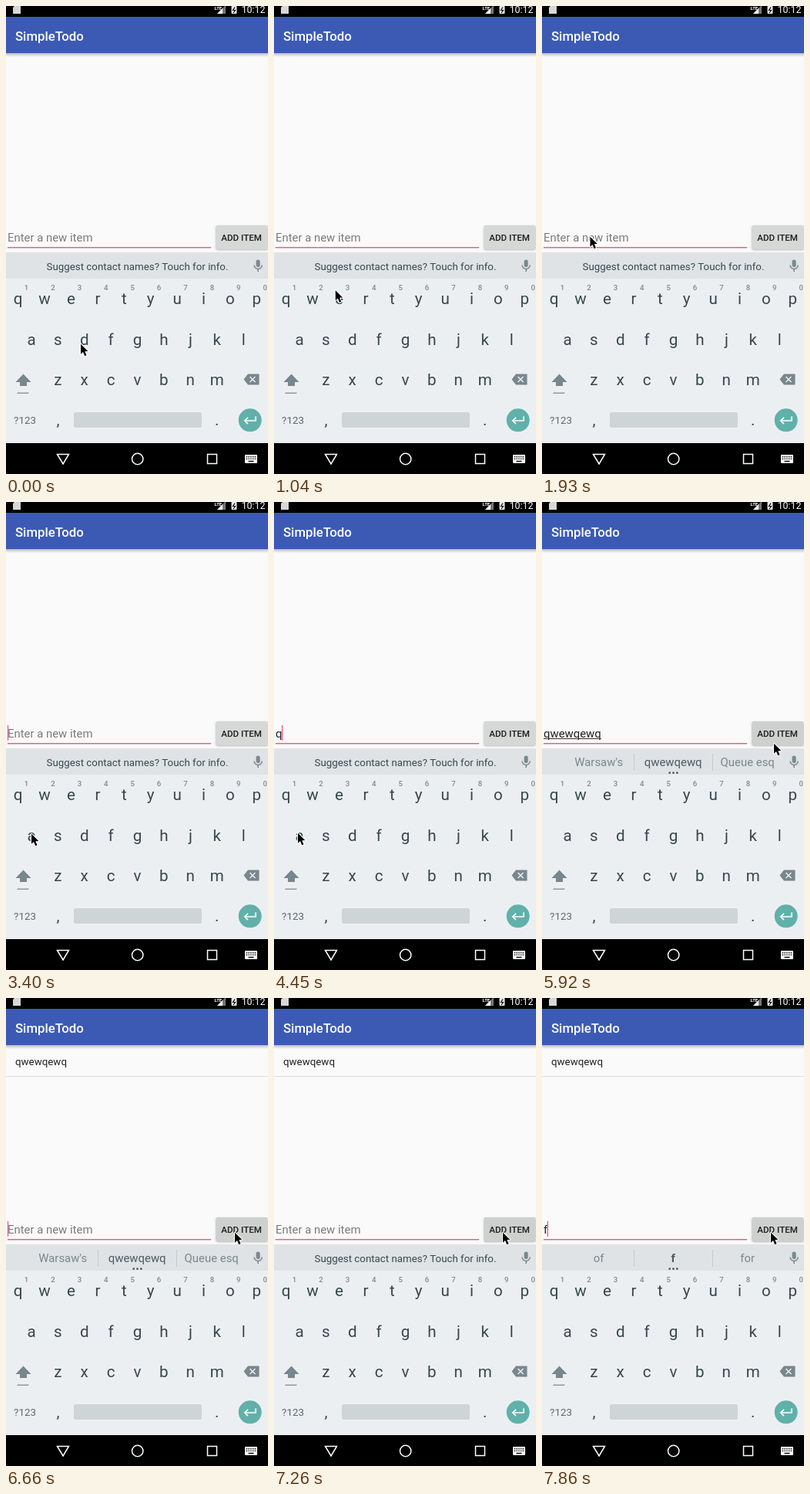
An HTML page with a canvas that plays this animation: 340x606 px, repeating every 8 s.

```html
<!DOCTYPE html>
<html lang="en">
<head>
<meta charset="utf-8">
<title>SimpleTodo</title>
<style>
html, body { margin: 0; width: 100%; height: 100%; overflow: hidden; background: #000; }
canvas { display: block; width: 340px; height: 606px; }
</style>
</head>
<body>
<canvas id="stage"></canvas>
<script>
const W = 340, H = 606, LOOP = 8000, STEPS = 54, STEP = LOOP / STEPS;
const canvas = document.getElementById('stage');
const ctx = canvas.getContext('2d');
const dpr = window.devicePixelRatio || 1;
canvas.width = W * dpr;
canvas.height = H * dpr;

const INK = '#37474f', KEYS = '#eceff1', ICON = '#78868d', PINK = '#ee5f87';
const TODO = 'qwewqewq', HINT = 'Suggest contact names? Touch for info.';

// The screen refreshes in equal steps; events are given in steps.
const TYPE = 30, TYPED = 36, MARKED = 37, HOVER = 40, PRESS = 43, ADDED = 45, NEXT = 52;

// Pointer stops: step, x, y.
const PATH = [
  [4, 96.5, 437], [10, 62, 298], [17, 62, 298], [20, 32.5, 429],
  [25, 32.5, 429], [27, 30.5, 428], [37, 30.5, 428], [HOVER, 300.5, 312], [41, 296.5, 303]
];

function pointerAt(n) {
  const next = PATH.findIndex(stop => stop[0] > n);
  if (next === 0) return PATH[0].slice(1);
  if (next < 0) return PATH[PATH.length - 1].slice(1);
  const [s0, x0, y0] = PATH[next - 1], [s1, x1, y1] = PATH[next];
  const u = (n - s0) / (s1 - s0), k = u * u * (3 - 2 * u);
  return [x0 + (x1 - x0) * k, y0 + (y1 - y0) * k];
}

function entryAt(n) {
  if (n >= NEXT) return 'f';
  if (n < TYPE || n >= ADDED) return '';
  return TODO.slice(0, 1 + Math.floor((n - TYPE) * 1.25));
}

// The caret restarts its blink at every edit.
function caretAt(n) {
  let edit = 2;
  if (n >= NEXT) edit = NEXT;
  else if (n >= ADDED) edit = ADDED;
  else if (n >= TYPE) edit = Math.min(n, TYPED);
  return n >= edit && ((n - edit) * STEP) % 1030 < 520;
}

function wordsAt(n) {
  if (n > NEXT) return ['of', 'f', 'for'];
  if (n < TYPE + 2 || n > ADDED) return null;
  return n < MARKED ? ['awe', 'qwe', 'was'] : ["Warsaw's", TODO, 'Queue esq'];
}

function buttonAt(n) {
  if (n < HOVER) return '#d6d7d7';
  return n >= PRESS && n < ADDED ? '#c6c7c7' : '#cecfcf';
}

function rect(x, y, w, h, color, r = 0) {
  ctx.fillStyle = color;
  ctx.beginPath();
  ctx.roundRect(x, y, w, h, r);
  ctx.fill();
}

function text(s, x, y, size, color, align = 'left', weight = 400) {
  ctx.font = `${weight} ${size}px Roboto, sans-serif`;
  ctx.textAlign = align;
  ctx.fillStyle = color;
  ctx.fillText(s, x, y);
}

function trace(points, closed) {
  ctx.beginPath();
  points.forEach(([x, y]) => ctx.lineTo(x, y));
  if (closed) ctx.closePath();
}

function poly(points, color) {
  trace(points, true);
  ctx.fillStyle = color;
  ctx.fill();
}

function line(points, color, width, closed = false) {
  trace(points, closed);
  ctx.strokeStyle = color;
  ctx.lineWidth = width;
  ctx.stroke();
}

function circle(x, y, r, sweep = Math.PI * 2) {
  ctx.beginPath();
  ctx.arc(x, y, r, 0, sweep);
}

function fade(y, h, alpha) {
  const g = ctx.createLinearGradient(0, y, 0, y + h);
  g.addColorStop(0, `rgba(0,0,0,${alpha})`);
  g.addColorStop(1, 'rgba(0,0,0,0)');
  ctx.fillStyle = g;
  ctx.fillRect(0, y, W, h);
}

function statusBar() {
  rect(0, 0, W, 14, '#000');
  poly([[9, 2], [12, -1], [19, -1], [19, 10], [9, 10]], '#d8d8d8');
  text('LTE', 270.5, 4.5, 6, '#fff', 'left', 700);
  poly([[274, 10], [285, 10], [285, -1]], '#777');
  poly([[274, 10], [281, 10], [281, 3]], '#fff');
  rect(292.5, 0, 7, 10, '#e8e8e8', 1);
  line([[297, 1.5], [294.5, 5.5], [297.5, 5.5], [295, 9]], '#000', 1.1);
  text('10:12', 336.5, 9, 12.4, '#fff', 'right');
}

function appBar() {
  rect(0, 14, W, 47, '#3c5ab4');
  text('SimpleTodo', 12, 44.5, 16.75, '#fff', 'left', 500);
  fade(61, 5, 0.24);
}

function form(n) {
  const entry = entryAt(n), size = 14.9, base = 304.5;
  text(entry || 'Enter a new item', 2, base, size, entry ? '#212121' : '#7b7b7b');
  const end = 2 + (entry && ctx.measureText(entry).width);
  if (n >= MARKED && n < ADDED) rect(2, 306, end - 2, 1, '#333');
  if (caretAt(n)) rect(entry ? end - 0.5 : 1.8, 289, 1.4, 20, PINK);
  rect(2, 312, 264, 1.4, PINK);

  ctx.save();
  ctx.shadowColor = 'rgba(0,0,0,0.28)';
  ctx.shadowBlur = 2.5 * dpr;
  ctx.shadowOffsetY = dpr;
  rect(272.5, 284, 67, 31, buttonAt(n), 2);
  ctx.restore();
  text('ADD ITEM', 305.6, 303.7, 11.6, '#1d1d1d', 'center', 500);
}

function mic() {
  rect(324.6, 328.5, 5, 9.5, ICON, 2.5);
  circle(327.1, 335.5, 5, Math.PI);
  ctx.strokeStyle = ICON;
  ctx.lineWidth = 1.4;
  ctx.stroke();
  rect(326.4, 340, 1.5, 4, ICON);
}

function suggestions(words) {
  rect(0, 319, W, 34, '#dfe3e5');
  if (!words) {
    text(HINT, 170.5, 342, 13.32, INK, 'center');
  } else {
    words.forEach((word, i) => {
      const mid = i === 1, weight = mid && word.length === 1 ? 700 : 400;
      text(word, 73.7 + i * 96.5, 342.3, 14.9, mid ? '#4b5a62' : '#7a878e', 'center', weight);
      if (i) rect(17 + i * 102, 326, 1, 22, '#c6cccf');
      rect(164.5 + i * 4.8, 349.4, 2.4, 2.4, INK, 0.6);
    });
  }
  mic();
}

function keyRow(keys, x, y, size = 20.6, color = INK, weight = 400) {
  [...keys].forEach((key, i) => text(key, x + i * 34.4, y, size, color, 'center', weight));
}

function keyboard() {
  rect(0, 353, W, 213, KEYS);
  keyRow('qwertyuiop', 15.7, 386);
  keyRow('asdfghjkl', 33, 438.6);
  keyRow('zxcvbnm', 67.3, 491);
  keyRow('1234567890', 26.6, 367.5, 9.6, '#7c898f', 500);

  poly([[22.5, 476.5], [32.5, 487], [27, 487], [27, 492], [18, 492], [18, 487], [12.5, 487]], ICON);
  rect(14.5, 500.5, 15, 1.5, '#8c989e');

  poly([[308.5, 483.5], [314, 476.5], [328.5, 476.5], [328.5, 490.5], [314, 490.5]], ICON);
  for (const d of [-3.5, 3.5]) line([[320 - d, 480], [320 + d, 487]], KEYS, 1.5);

  text('?123', 24.5, 541, 13.4, '#5a6970', 'center');
  text(',', 67.5, 543, 20.6, INK, 'center');
  text('.', 273.7, 543, 20.6, INK, 'center');
  rect(88, 526, 166, 20, '#cfd4d7', 2.5);

  circle(316.7, 536.3, 15);
  ctx.fillStyle = '#62b0aa';
  ctx.fill();
  line([[324, 531.5], [324, 537], [310.5, 537]], '#fff', 1.7);
  line([[314, 532.8], [309.8, 537], [314, 541.2]], '#fff', 1.7);
}

function navBar() {
  rect(0, 566, W, 40, '#000');
  line([[66.5, 580.5], [81.5, 580.5], [74, 593]], '#fff', 1.5, true);
  circle(170.7, 586.5, 7.2);
  ctx.stroke();
  ctx.strokeRect(261.5, 580.5, 12, 12);
  rect(310, 581, 16, 11, '#fff', 1.2);
  for (let i = 0; i < 10; i++)
    rect(311.8 + (i % 5) * 2.7, 583 + Math.floor(i / 5) * 2.7, 1.4, 1.4, '#000');
  rect(314.5, 588.8, 7, 1.4, '#000');
}

function pointer(n) {
  if (n > MARKED && n < HOVER) return;
  ctx.save();
  ctx.translate(...pointerAt(n));
  ctx.lineJoin = 'round';
  const arrow = [[0.5, 0.8], [0.5, 13.8], [3.5, 11], [5.7, 16.3], [8, 15.3], [5.8, 10.2], [9.8, 10]];
  line(arrow, '#fff', 2, true);
  poly(arrow, '#000');
  ctx.restore();
}

function draw(t) {
  const n = Math.floor(t / STEP + 0.05) % STEPS;
  ctx.setTransform(dpr, 0, 0, dpr, 0, 0);
  rect(0, 0, W, H, '#fafafa');
  statusBar();
  appBar();
  if (n >= ADDED) {
    text(TODO, 12, 87, 13.35, '#212121');
    rect(0, 101, W, 1, '#dedede');
  }
  form(n);
  suggestions(wordsAt(n));
  keyboard();
  navBar();
  pointer(n);
}

const start = performance.now();
function tick() {
  draw((performance.now() - start) % LOOP);
  requestAnimationFrame(tick);
}
tick();
</script>
</body>
</html>
```
